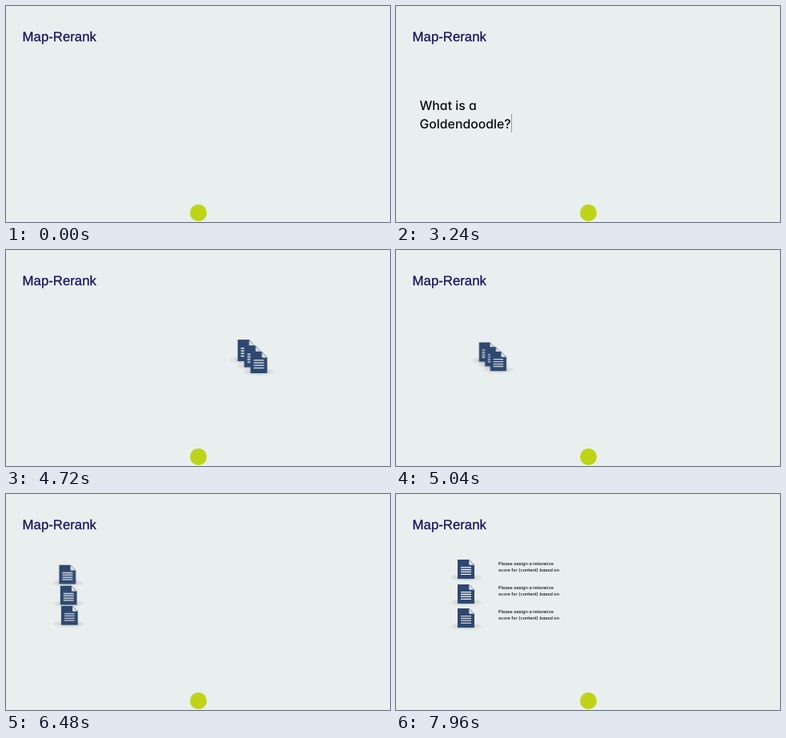
Recreate the animation shown at these times as an HTML page. Size 480 by 270 pixels, loop 8000 ms.

```html
<!DOCTYPE html>
<html lang="en">
<head>
<meta charset="utf-8">
<title>Map-Rerank</title>
<style>
  html, body { margin: 0; width: 100%; height: 100%; overflow: hidden; background: #e9efef; }
  #stage { position: relative; width: 480px; height: 270px; overflow: hidden; text-rendering: geometricPrecision; }
  #stage > *, .doc { position: absolute; }
  h1 {
    left: 20.6px; top: 29px; margin: 0; color: #15105f;
    font: 400 16.8px/20px "Liberation Sans", Arial, sans-serif;
    -webkit-text-stroke: .25px #15105f;
  }
  .badge { left: 229.5px; top: 247.5px; width: 21px; height: 21px; border-radius: 50%; background: #bfd414; }

  .typed { white-space: pre; color: #0b0b0b; font-family: Inter, sans-serif; font-feature-settings: "cv11"; }
  .typed span { animation: typed 8s step-end infinite both; }
  @keyframes typed { 0% { visibility: hidden; } 0.01% { visibility: visible; } 40%, 100% { visibility: hidden; } }

  #query { left: 0; top: 0; width: 480px; height: 270px; animation: leave 8s linear infinite; }
  #query .typed { position: absolute; left: 29.5px; top: 114px; font-size: 15.8px; font-weight: 450; line-height: 22.5px; }
  @keyframes leave { 0%, 43.75% { opacity: 1; } 53.75%, 100% { opacity: 0; } }

  .caret {
    position: absolute; left: 0; top: 0; width: 1px; height: 23px; background: #333;
    animation: travel 8s infinite, blink 8s linear infinite;
  }
  @keyframes travel {
    0%      { transform: translate(29px, 112px); animation-timing-function: step-end; }
    12.5%   { transform: translate(29px, 112px); animation-timing-function: steps(3); }
    15.5%   { transform: translate(64px, 112px); animation-timing-function: step-end; }
    16%     { transform: translate(64px, 112px); animation-timing-function: steps(6); }
    22%     { transform: translate(101px, 112px); animation-timing-function: step-end; }
    25.25%  { transform: translate(29px, 135px); animation-timing-function: steps(13); }
    35.5%, 100% { transform: translate(144px, 135px); }
  }
  @keyframes blink {
    0%, 6.4% { opacity: 0; }
    8.5%, 9.5% { opacity: .6; }
    12.5%, 23.9% { opacity: .1; }
    24%, 25.9% { opacity: 0; }
    26%, 36% { opacity: .15; }
    39.5%, 41% { opacity: .45; }
    44%, 100% { opacity: 0; }
  }

  #docs { left: 0; top: 0; animation: arrive 8s linear infinite; }
  @keyframes arrive { 0%, 42.5% { opacity: 0; } 48.75%, 100% { opacity: 1; } }
  .doc {
    left: 0; top: 0; width: 21px; height: 24px; transform-origin: 0 0;
    animation: move 8s cubic-bezier(.37, 0, .63, 1) infinite;
  }
  .doc svg { display: block; width: 100%; height: 100%; overflow: visible; }
  .d1 { --from: 399px, 110px;     --stack: 22px, 117px; --row: 77px, 82px;  z-index: 1; }
  .d2 { --from: 407.6px, 118.5px; --stack: 29px, 122px; --row: 77px, 113px; z-index: 2; }
  .d3 { --from: 416.2px, 127px;   --stack: 35px, 127px; --row: 77px, 143px; z-index: 3; }
  .d2 { animation: move 8s cubic-bezier(.37, 0, .63, 1) infinite, lift 8s step-end infinite; }
  .d3 .lines { opacity: .8; }
  @keyframes move {
    0%, 54.56%     { transform: translate(var(--from)) scale(1.02, 1.19); }
    66.81%, 72.5%  { transform: translate(var(--stack)) scale(.95, .96); }
    84.5%, 100%    { transform: translate(var(--row)) scale(1); }
  }
  @keyframes lift { 0% { z-index: 2; } 66.81%, 100% { z-index: 4; } }

  .prompt { left: 128px; font-size: 5.5px; font-weight: 500; line-height: 8px; animation: prompt 8s step-end infinite; }
  @keyframes prompt { 0% { opacity: 0; } 90%, 100% { opacity: 1; } }
</style>
</head>
<body>
<div id="stage">
  <h1>Map-Rerank</h1>
  <div class="badge"></div>
  <div id="query"><div class="typed"></div><div class="caret"></div></div>
  <div id="docs"></div>
</div>

<svg width="0" height="0" style="position:absolute">
  <defs>
    <radialGradient id="shade">
      <stop offset="0" stop-color="#55504a" stop-opacity=".4"/>
      <stop offset=".5" stop-color="#55504a" stop-opacity=".16"/>
      <stop offset="1" stop-color="#55504a" stop-opacity="0"/>
    </radialGradient>
    <symbol id="page" overflow="visible">
      <ellipse cx="10.5" cy="22.5" rx="22" ry="5" fill="url(#shade)"/>
      <path d="M0 0H14.3L21 6.7V24H0Z" fill="#2f486f"/>
      <path d="M14.3 .6V6.7H20.4Z" fill="#dfe7ec"/>
    </symbol>
  </defs>
</svg>

<script>
  const stage = document.getElementById('stage');

  // Wrap each character in a span that appears at timeOf(index) ms.
  function type(el, text, timeOf) {
    [...text].forEach((ch, i) => {
      const span = document.createElement('span');
      span.textContent = ch;
      span.style.animationDelay = timeOf(i) + 'ms';
      el.append(span);
    });
  }

  const queryTime = i =>
    i < 3 ? 1080 + i * 80 :
    i < 9 ? 1360 + (i - 3) * 80 :
    2080 + Math.max(0, i - 10) * 63;
  type(document.querySelector('#query .typed'), 'What is a\nGoldendoodle?', queryTime);

  const promptTime = i => i < 13 ? 7240 + i * 16 : 7600 + (i - 13) * 9;
  for (let n = 0; n < 3; n++) {
    const doc = document.createElement('div');
    doc.className = 'doc d' + (n + 1);
    doc.innerHTML = `<svg viewBox="0 0 21 24"><use href="#page"/>
      <path class="lines" d="M4 9.6H17M4 12.5H17M4 15.4H17M4 18.3H17" stroke="#eef2f5" stroke-width="1.3"/></svg>`;
    document.getElementById('docs').append(doc);

    const prompt = document.createElement('div');
    prompt.className = 'typed prompt';
    prompt.style.top = 84.4 + n * 30 + 'px';
    type(prompt, 'Please assign a relevance\nscore for {content} based on', promptTime);
    stage.append(prompt);
  }
</script>
</body>
</html>
```
